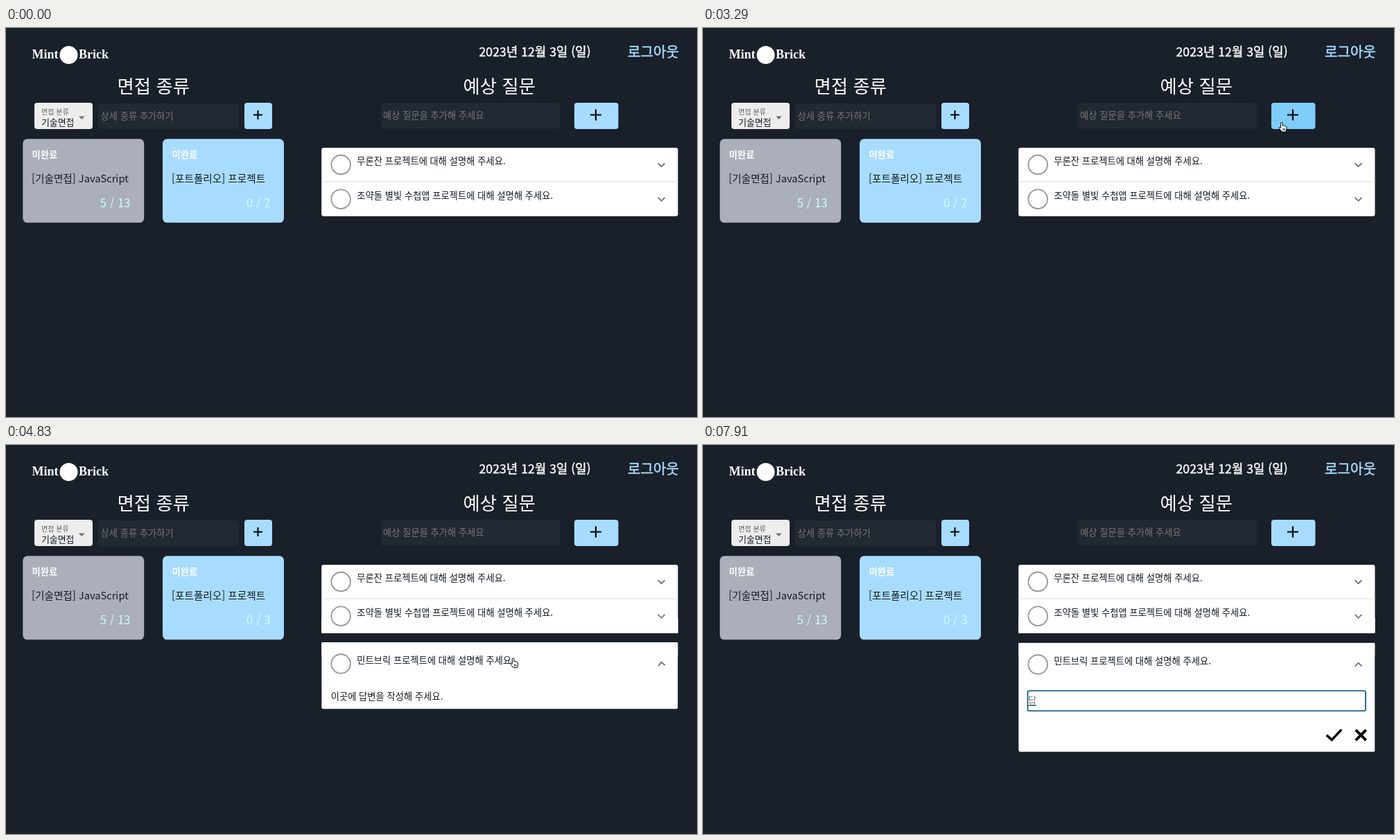
An HTML page that plays this animation: 997 by 562 pixels, repeating every 8 s.

```html
<!DOCTYPE html>
<html lang="ko">
<head>
<meta charset="utf-8">
<title>면접 준비</title>
<style>
  html, body { margin: 0; width: 100%; height: 100%; overflow: hidden; background: #19202a; }
  body > svg { display: block; width: 997px; height: 562px; }
  text { font: 13.3px "Noto Sans CJK KR", "Noto Sans CJK", sans-serif; fill: #151a22; white-space: pre; }
  .white { fill: #fff; }
  .title { font-size: 26.4px; fill: #fff; }
  .brand { font: bold 18px "Liberation Serif", serif; fill: #fff; }
  .hint { fill: #757575; }
  .status { font-weight: 700; fill: #fff; }
  .name { font-size: 14.65px; }
  .count { font-size: 16.7px; fill: #c9ffff; text-anchor: end; }
  .date { font-size: 17.75px; fill: #fff; stroke: #fff; stroke-width: .4; }
  .logout { font-size: 20.1px; fill: #a8dcff; stroke: #a8dcff; stroke-width: .5; }
  .line { fill: none; stroke: #000; }
  .ring { fill: none; stroke: #999; stroke-width: 1.9; }
  .chevron { fill: none; stroke: #707070; stroke-width: 1.8; }
</style>
</head>
<body>
<svg viewBox="0 0 997 562">
  <defs>
    <circle id="ring" class="ring" cx="28" r="13.8"/>
    <path id="chev" class="chevron" d="M-4.9 -2.4L0 2.5L4.9 -2.4"/>
    <path id="beamShape" d="M-3 -7Q0 -7 0 -5V5Q0 7 -3 7M3 -7Q0 -7 0 -5M0 5Q0 7 3 7M-2 3H2"/>
  </defs>

  <!-- header -->
  <text class="brand" x="37.5" y="44">Mint</text>
  <circle cx="90.5" cy="39" r="13" fill="#fff"/>
  <text class="brand" x="105" y="44">Brick</text>
  <text class="date" x="682.5" y="41">2023년 12월 3일 (일)</text>
  <text class="logout" x="897" y="41.5">로그아웃</text>

  <!-- left column -->
  <text class="title" x="160.5" y="93.7">면접 종류</text>
  <rect x="41" y="108" width="84" height="38" rx="4" fill="#ededed"/>
  <text x="51" y="125" style="font-size:10px;fill:#666">면접 분류</text>
  <text x="51" y="140.5" style="font-size:12.9px">기술면접</text>
  <path d="M105 127.5H113.6L109.3 132Z" fill="#707070"/>
  <rect x="133" y="109" width="203" height="37" rx="4" fill="#232932"/>
  <text class="hint" x="136.5" y="132">상세 종류 추가하기</text>
  <rect x="344" y="108" width="40" height="38" rx="4" fill="#a8dcff"/>
  <path class="line" stroke-width="2" d="M357 125.5H370M363.5 119V132"/>

  <rect x="24.3" y="160.3" width="174.9" height="121" rx="6.5" fill="#abafba"/>
  <text class="status" x="37.5" y="187.5">미완료</text>
  <text class="name" x="37" y="222.5">[기술면접] JavaScript</text>
  <text class="count" x="179.5" y="259">5 / 13</text>
  <rect x="226" y="160.3" width="175" height="121" rx="6.5" fill="#a8dcff"/>
  <text class="status" x="239.5" y="187.5">미완료</text>
  <text class="name" x="239" y="222.5">[포트폴리오] 프로젝트</text>
  <text class="count" x="381.5" y="259" id="count"></text>

  <!-- right column -->
  <text class="title" x="659.5" y="93.7">예상 질문</text>
  <rect x="541" y="108" width="258.5" height="37.5" rx="4" fill="#232932"/>
  <rect id="focus" x="541.4" y="108.3" width="257.4" height="37.2" rx="3.5" fill="#171d26" stroke="#a8dcff" stroke-width="1.9"/>
  <text class="hint" id="askHint" x="544" y="131">예상 질문을 추가해 주세요</text>
  <text class="white" id="askText" x="544" y="131">민트브릭 프로젝트에 대해 설명해 주세요.</text>
  <rect id="caret" y="119" width="1" height="16" fill="#fff"/>
  <rect id="add" x="820" y="108" width="63.5" height="38" rx="4"/>
  <path class="line" stroke-width="2.2" d="M843 125.5H859M851 117.5V133.5"/>

  <rect x="455.2" y="173" width="514.3" height="99" rx="3.3" fill="#fff"/>
  <rect id="square" x="455.2" y="250" width="514.3" height="22" fill="#fff"/>
  <use href="#ring" x="455.2" y="197.5"/>
  <use href="#chev" x="945.6" y="197.7"/>
  <text x="506.3" y="197">무론잔 프로젝트에 대해 설명해 주세요.</text>
  <rect x="455.2" y="221.6" width="514.3" height="1" fill="#dedede"/>
  <use href="#ring" x="455.2" y="247.2"/>
  <use href="#chev" x="945.6" y="247.3"/>
  <text x="506.3" y="246.7">조약돌 별빛 수첩앱 프로젝트에 대해 설명해 주세요.</text>

  <!-- new question, clipped to its own height -->
  <svg id="item" x="455.2" width="514.3">
    <rect width="100%" height="100%" rx="3.3" fill="#fff"/>
    <rect width="100%" height="20" fill="#fff"/>
    <rect id="divider" width="100%" height="1" fill="#dedede"/>
    <g id="head">
      <use href="#ring"/>
      <text x="51.1" y="-.5">민트브릭 프로젝트에 대해 설명해 주세요.</text>
      <use id="arrowUp" href="#chev"/>
    </g>
    <g id="body">
      <g id="view">
        <text x="13.5" y="20.5">이곳에 답변을 작성해 주세요.</text>
        <g class="line" stroke-width="2.7" stroke-linejoin="round" stroke-linecap="round">
          <path d="M447 51H439.5Q436 51 436 54.5V70Q436 73.5 439.5 73.5H455Q458.5 73.5 458.5 70V62"/>
          <path stroke-width="2.3" d="M445 65L446.3 60L456.5 49.5Q458 48.2 459.7 49.8Q461.3 51.5 460 53L449.8 63.5ZM454 52L457.5 55.5"/>
          <path stroke-width="2.4" d="M480 52H501M485.5 51.5V49.5Q485.5 48 487 48H494Q495.5 48 495.5 49.5V51.5M482 52.5V71Q482 73.5 484.5 73.5H496.5Q499 73.5 499 71V52.5"/>
          <path stroke-width="2" d="M486.5 56.5V69M490.5 56.5V69M494.5 56.5V69"/>
        </g>
      </g>
      <g id="edit">
        <rect id="area" x="13.3" y="6.5" width="487.5" height="29" rx="2" fill="#fff" stroke="#23658c" stroke-width="1.9"/>
        <text class="hint" id="answerHint" x="13.5" y="25.3">이곳에 답변을 작성해 주세요.</text>
        <text id="answer" x="13.7" y="25.3" fill-opacity=".6"></text>
        <rect id="mark" x="13.7" y="27.3" width="12.3" height="1" fill="#444"/>
        <rect id="answerCaret" x="14" y="13" width="1" height="16" fill="#000"/>
        <path class="line" stroke-width="3.5" d="M444.5 70.5L452 77.5L466 62.5"/>
        <path class="line" stroke-width="3.9" d="M486.5 63L501.5 78M501.5 63L486.5 78"/>
      </g>
    </g>
  </svg>

  <g id="cursor">
    <path id="pointer" d="M0 0V12.5L3 9.8L5 14.3L7 13.4L5.1 9H9Z" stroke="#fff" stroke-width=".8"/>
    <path id="hand" d="M-1.3 1Q0 -1 1.3 1V5.2Q2.5 4.4 3.3 5.4Q4.6 4.8 5.2 5.9Q6.7 5.5 7 7V10L5.8 14H.3L-3.8 8.8Q-4.2 7.2 -2.6 7.2L-1.3 8.5ZM2 9V12M4 9V12" fill="#fff" stroke="#000"/>
    <g id="beam" fill="none">
      <use href="#beamShape" stroke="#000" stroke-width="2.4"/>
      <use href="#beamShape" stroke="#ddd"/>
    </g>
  </g>
</svg>
<script>
const LOOP = 8000, STEP = 70;
const $ = id => document.getElementById(id);
const show = (id, on) => $(id).style.display = on ? '' : 'none';
const set = (id, attrs) => { for (const k in attrs) $(id).setAttribute(k, attrs[k]); };
const inBox = (x, y, l, t, r, b) => x >= l && x <= r && y >= t && y <= b;
const ramp = (t, start, span) => {
  const p = Math.min(1, Math.max(0, (t - start) / span));
  return p * p * (3 - 2 * p);
};

// cursor path: time, x, y
const path = [
  [70, 279, 477], [140, 415, 320], [280, 565, 170], [490, 565, 170], [770, 606, 123],
  [840, 606, 123], [910, 579, 143], [1400, 579, 143], [1470, 603, 127], [2380, 603, 127],
  [2450, 634, 134], [2800, 738, 155], [3010, 824, 146], [3220, 835, 136], [3850, 835, 136],
  [4130, 770, 210], [4340, 692, 282], [4550, 715, 294], [4760, 715, 294], [4970, 765, 335],
  [5180, 831, 380], [5530, 888, 392], [5600, 901, 404], [7000, 901, 404], [7070, 896, 405],
  [7420, 808, 367], [LOOP, 808, 367]
];

function cursorAt(t) {
  const i = Math.max(1, path.findIndex(k => k[0] > t));
  const [t0, x0, y0] = path[i - 1], [t1, x1, y1] = path[i];
  const p = Math.max(0, (t - t0) / (t1 - t0));
  return [x0 + (x1 - x0) * p, y0 + (y1 - y0) * p];
}

function draw(t) {
  // question field
  const focused = t >= 1330 && t < 3220, filled = t >= 2100 && t < 3290;
  show('focus', focused);
  show('askHint', !filled);
  show('askText', filled);
  show('caret', focused && (t - (filled ? 2100 : 1330)) % 1120 < 560);
  set('caret', { x: filled ? 768.5 : 544.5 });
  const hover = ramp(t, 2940, 210) - ramp(t, 3850, 250);
  set('add', { fill: `rgb(${168 - 42 * hover},${220 - 16 * hover},${255 - 5 * hover})` });

  // list and the opening panel
  const added = t >= 3570, editing = t >= 5740;
  $('count').textContent = added ? '0 / 3' : '0 / 2';
  show('square', added);
  show('item', added);
  const gap = ramp(t, 4700, 150), open = ramp(t, 4700, 300);
  const headH = 49.6 + 13.2 * gap;
  set('item', { y: 271.8 + 14 * gap, height: headH + (editing ? 95 : 85.5) * open });
  set('divider', { opacity: 1 - gap });
  set('head', { transform: `translate(0 ${25.2 + 6.1 * gap})` });
  set('arrowUp', { transform: `translate(490.4 .2) rotate(${180 * gap})` });
  set('body', { transform: `translate(0 ${headH})` });
  show('view', !editing);
  show('edit', editing);

  // answer field
  const typed = t >= 7700;
  show('area', t >= 7350);
  show('answerHint', !typed);
  show('mark', typed);
  show('answerCaret', t >= 7350 && !typed);
  $('answer').textContent = !typed ? '' : t < 7770 ? 'ㄷ' : t < 7910 ? '다' : '답';

  // the cursor's shape follows what lies under it
  const [x, y] = cursorAt(t);
  show('cursor', t >= 70 && !(t >= 2100 && t < 2450) && !typed);
  set('cursor', { transform: `translate(${x} ${y})` });
  const beam = inBox(x, y, 541, 108, 800, 146) || editing && inBox(x, y, 468, 355, 957, 385);
  const listEnd = !added ? 272 : t < 4760 ? 321 : 349;
  const hand = inBox(x, y, 820, 108, 884, 146) || inBox(x, y, 455, 173, 970, listEnd) ||
    inBox(x, y, 898, 396, 922, 430);
  show('beam', beam);
  show('hand', hand && !beam);
  show('pointer', !hand && !beam);
}

function tick() {
  const t = performance.now() % LOOP;
  draw(Math.floor(t / STEP) * STEP);
  requestAnimationFrame(tick);
}
tick();
</script>
</body>
</html>
```
